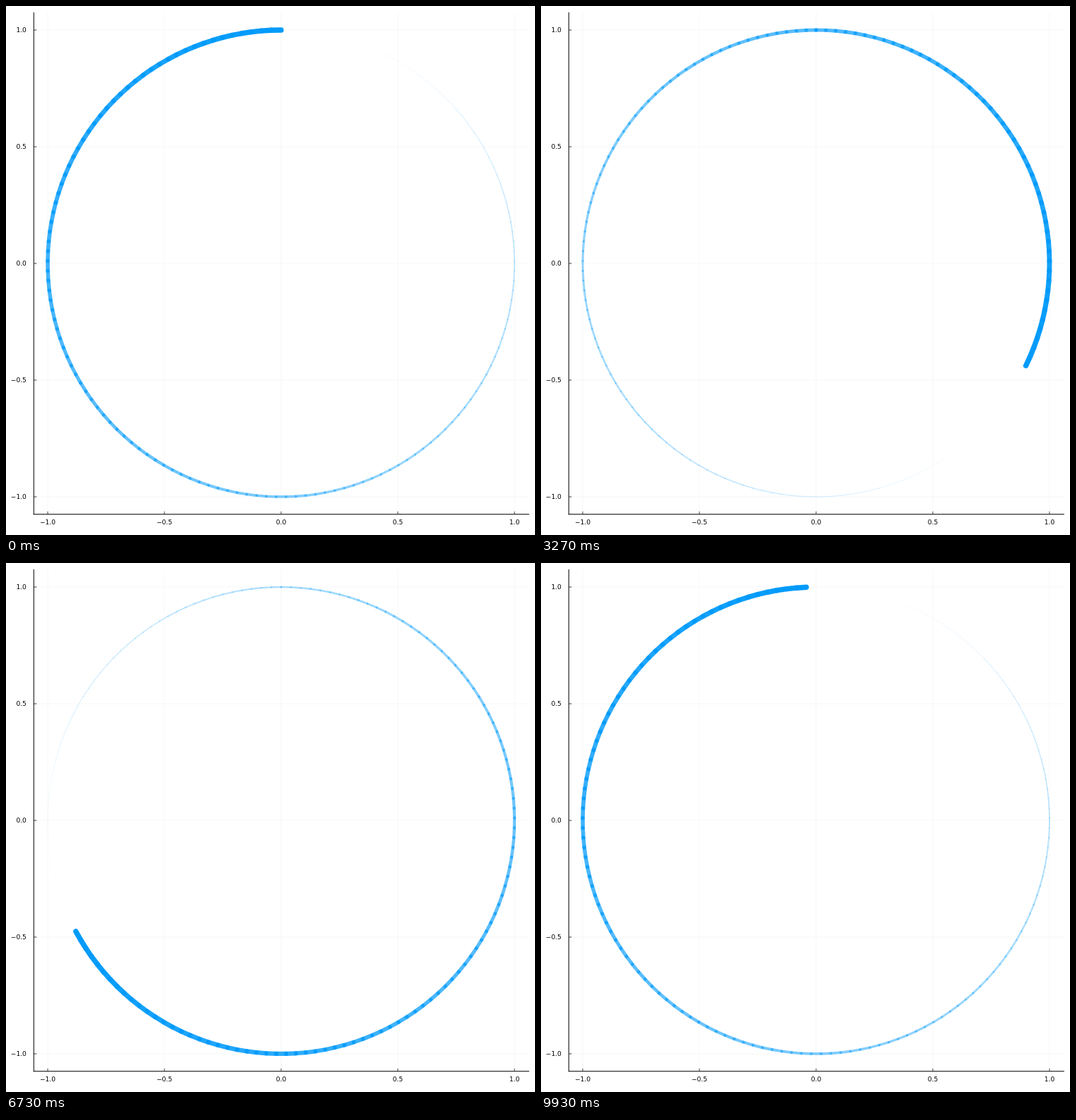
Animation, 748 px wide and 748 px high, one loop 9.99 s. Source, as an HTML page with a canvas:

```html
<!DOCTYPE html>
<html>
<head>
<meta charset="utf-8">
<style>
html, body { margin: 0; height: 100%; overflow: hidden; background: #fff; }
canvas { display: block; }
</style>
</head>
<body>
<canvas id="stage" width="748" height="748"></canvas>
<script>
const ctx = document.getElementById('stage').getContext('2d');
const COUNT = 150, LOOP = 9990, SCALE = 0.748;
const CX = 389, CY = 364, R = 330;
const LEFT = 39.3, RIGHT = 739.8, TOP = 9, BOTTOM = 718.7, TICK = 4;

function line(x1, y1, x2, y2) {
  ctx.beginPath();
  ctx.moveTo(x1, y1);
  ctx.lineTo(x2, y2);
  ctx.stroke();
}

function drawAxes() {
  const ticks = [-1, -0.5, 0, 0.5, 1];
  ctx.globalAlpha = 0.1;
  ctx.strokeStyle = ctx.fillStyle = '#000';
  ctx.lineCap = 'butt';
  ctx.lineWidth = 0.5 * SCALE;
  for (const v of ticks) {
    line(CX + v * R, TOP, CX + v * R, BOTTOM);
    line(LEFT, CY - v * R, RIGHT, CY - v * R);
  }
  ctx.globalAlpha = 1;
  ctx.lineWidth = 1;
  line(LEFT, TOP, LEFT, BOTTOM + 0.5);
  line(LEFT - 0.5, BOTTOM, RIGHT, BOTTOM);
  ctx.lineWidth = SCALE;
  ctx.font = '9.1px "DejaVu Sans", sans-serif';
  for (const v of ticks) {
    const x = CX + v * R, y = CY - v * R;
    const label = v.toFixed(1).replace('-', '\u2212');
    line(x, BOTTOM, x, BOTTOM - TICK);
    line(LEFT, y, LEFT + TICK, y);
    ctx.textAlign = 'center';
    ctx.fillText(label, x, 733.2);
    ctx.textAlign = 'right';
    ctx.fillText(label, 28.9, y + 3.3);
  }
}

// The first and last points coincide at the top of the circle.
function point(i) {
  const a = (i % COUNT) / (COUNT - 1) * 2 * Math.PI;
  return [CX + R * Math.sin(a), CY - R * Math.cos(a)];
}

function drawTrail(step) {
  ctx.strokeStyle = '#009afa';
  ctx.lineCap = 'round';
  for (let j = 1; j < COUNT - 1; j++) {
    const strength = j / (COUNT - 1);
    ctx.globalAlpha = strength;
    ctx.lineWidth = 10 * SCALE * strength;
    line(...point(step + j), ...point(step + j + 1));
  }
}

// Steps run at 15 per second, with start times rounded to 10 ms.
const startOf = step => Math.round(step * 20 / 3) * 10;

function stepAt(time) {
  const step = Math.min(COUNT - 1, Math.floor(time * 0.015) + 1);
  return startOf(step) <= time ? step : startOf(step - 1) <= time ? step - 1 : step - 2;
}

function draw() {
  ctx.clearRect(0, 0, 748, 748);
  drawAxes();
  drawTrail(stepAt(performance.now() % LOOP));
  requestAnimationFrame(draw);
}
draw();
</script>
</body>
</html>
```
